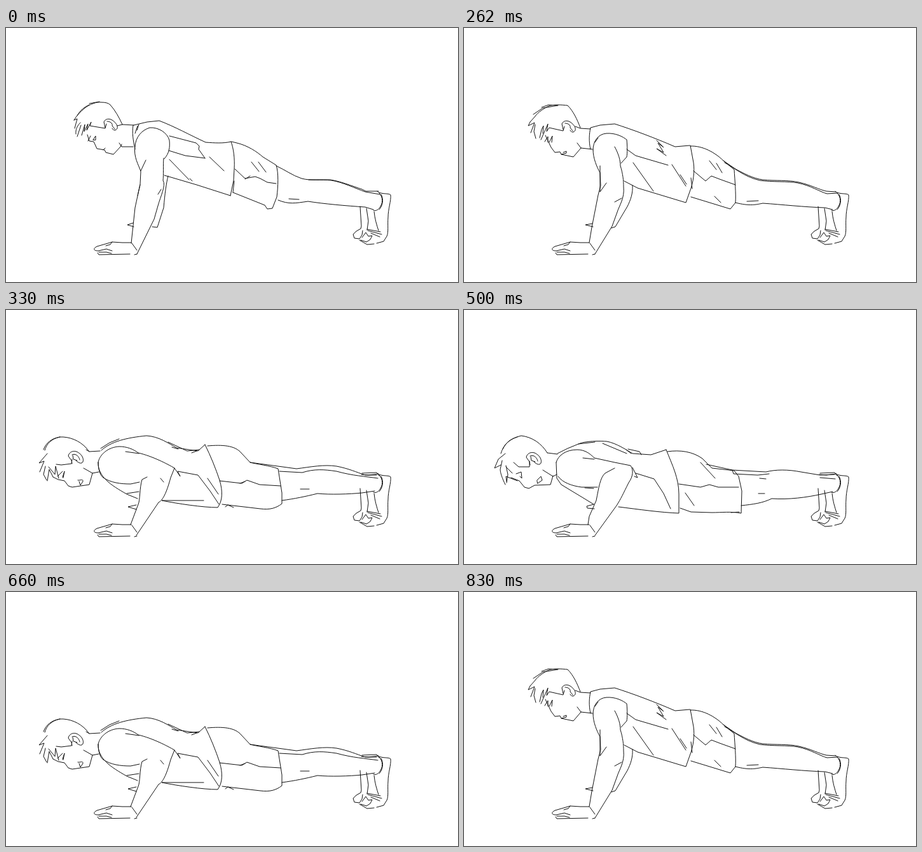
Recreate the animation shown at these times as an HTML page. Size 711x400 px, loop 1000 ms.

```html
<!DOCTYPE html>
<html lang="en">
<head>
<meta charset="utf-8">
<title>Push-up</title>
<style>
html, body { margin: 0; width: 100%; height: 100%; overflow: hidden; background: #fff; }
svg { display: block; width: 711px; height: 400px; fill: none; stroke: #111; stroke-width: 1; stroke-linecap: round; stroke-linejoin: round; }
.pose { visibility: hidden; animation: 1s step-end infinite; }
#high { animation-name: high; }
#bend { animation-name: bend; }
#low { animation-name: low; }
#floor { animation-name: floor; }
@keyframes high { 0% { visibility: visible } 16%, 100% { visibility: hidden } }
@keyframes bend { 0% { visibility: hidden } 16% { visibility: visible } 33% { visibility: hidden } 83%, 100% { visibility: visible } }
@keyframes low { 0% { visibility: hidden } 33% { visibility: visible } 50% { visibility: hidden } 66% { visibility: visible } 83%, 100% { visibility: hidden } }
@keyframes floor { 0% { visibility: hidden } 50% { visibility: visible } 66%, 100% { visibility: hidden } }
</style>
</head>
<body>
<svg viewBox="0 0 711 400">
  <defs>
    <path id="ear" d="M156 157L154 148C156 143 162 142 167 145C173 149 176 154 175 158C173 162 169 162 167 158M159 147C164 147 168 150 167 154L171 159"/>
    <path id="earLow" d="M104 242L103 237L98 230C99 224 105 221 111 223C118 226 123 233 121 239C119 243 114 241 110 237M104 228C110 225 115 231 116 236M105 229L106 235L112 237"/>
    <path id="sock" d="M560 257L583 256L587 261M559 259L570 260L586 258"/>
  </defs>

  <!-- feet and front hand -->
  <path d="M587 259C593 262 603 260 605 263C606 272 601 285 601 298C600 310 602 322 599 328L594 336L583 339"/>
  <path d="M584 257C592 263 594 273 589 281C586 286 582 289 578 287M590 262C595 270 592 281 587 286"/>
  <path d="M557 281L559 312L558 316L551 320L546 325L548 331L556 332L560 326L561 319M567 284L570 304L568 318M579 289C580 300 583 310 586 319"/>
  <path d="M568 317L589 321M569 319L591 325M574 323L588 329M560 330L566 322L570 328L576 327L573 333L567 337L558 334M556 334L568 341L579 340"/>
  <path d="M197 338L183 338L167 337L143 344C137 347 137 351 145 351L158 348L167 351M167 337L164 341L157 343M144 354L146 357L195 356M146 353L158 353L166 355M198 339L206 350M202 357L206 356"/>

  <g id="high" class="pose">
    <path d="M107 145C111 138 117 132 124 126C132 120 142 116 150 117C156 117 161 118 164 121C172 130 178 141 183 152M112 138C116 130 124 124 131 121M131 119L147 116"/>
    <path d="M107 145L112 143L108 158M117 149C112 154 109 160 110 167M112 171L118 153M119 169L124 152L123 163L129 151L127 161L134 148L132 154L156 158L158 151"/>
    <path d="M128 168L131 178L138 179L143 190L155 192L157 196L169 199L180 187L182 183M156 189L153 192M129 178L133 170M137 176L141 170L141 176Z"/>
    <use href="#ear"/>
    <path d="M175 154L183 152L201 153M178 181L182 187L200 187M200 153C198 165 200 177 203 191"/>
    <path d="M201 153L222 148L241 146C265 155 290 169 314 180C328 181 342 182 354 179M207 154L203 166M209 152L206 161"/>
    <path d="M203 186C204 172 213 161 226 157C240 156 254 165 257 177C258 188 257 197 249 206M203 186C200 203 209 216 212 226L211 246L203 283L199 320L197 339"/>
    <path d="M248 205C247 216 248 232 247 240C252 248 243 265 239 280L233 301L206 356M212 225L220 208M211 247L207 264M239 262L244 254"/>
    <path d="M255 233C252 245 250 260 248 283L238 314L230 313M201 313L191 310L200 307"/>
    <path d="M249 232L256 234L300 247L353 264M354 179C358 190 360 205 359 222L358 240L353 264"/>
    <path d="M257 170L299 181L304 186L303 191L313 205M256 193L282 201L313 205M257 207L288 239M289 237L293 241M320 203L343 225"/>
    <path d="M355 179L363 181C380 185 395 195 404 203L425 216C429 228 428 250 426 266L419 284L411 285L407 279L357 259"/>
    <path d="M360 222L376 237L392 234L400 237L411 243L425 245M376 238L384 233M386 211L398 226M397 211L409 227M359 241L357 259"/>
    <path d="M425 217C440 224 450 232 465 237C480 241 495 238 512 240C530 243 548 252 565 258L588 262M476 239L510 239C525 241 545 249 560 254L566 257L586 257"/>
    <path d="M428 271C445 278 455 276 475 273C500 277 535 280 565 282L578 286M445 269L461 270"/>
  </g>

  <g id="bend" class="pose">
    <path d="M104 148L112 139C116 133 125 127 133 123C142 120 154 121 163 122C172 131 178 144 183 157M109 136L124 126L148 122M122 125L133 121L147 122"/>
    <path d="M104 148L101 154L111 149L105 165M112 152L110 163L113 174M119 173L122 160L125 154L124 166M121 176L132 151L130 163L134 157L156 162L158 155"/>
    <path d="M128 169L137 188L143 196L151 195L153 199L161 197L161 194L156 196M153 199L172 203L184 189M127 179L132 171L132 180M134 180L139 170L138 180"/>
    <use href="#ear" y="3"/>
    <path d="M175 155L183 158L199 159M178 181L184 189L202 191M199 191C196 178 197 167 199 157L214 153L237 151C265 160 300 173 332 187L355 185"/>
    <path d="M203 192C203 178 211 167 224 166C238 165 250 171 256 176C257 187 257 197 256 203L247 213M203 192C203 205 209 219 214 228L215 248L211 263L201 314L197 338M206 180L211 173"/>
    <path d="M237 187C243 198 246 208 246 217C250 230 251 240 251 250C253 268 244 280 241 290L233 312L206 356M214 217L214 258L224 244M237 274L248 268"/>
    <path d="M265 248C266 260 262 271 257 281L238 313L232 315M203 313L191 310L202 308"/>
    <path d="M252 241L273 252L349 275L355 258C361 243 363 225 361 212L356 185"/>
    <path d="M256 191L270 201L321 216M266 212L298 257M327 215L349 249M340 231L350 246M303 177L314 188L305 181L314 196L303 190L318 201"/>
    <path d="M356 186C375 185 395 196 408 209L425 223C426 240 428 260 427 275L419 285L357 266M361 225L380 241L389 233L402 238L427 247M386 209L397 223M397 213L406 228M357 236L359 253M394 265L404 275"/>
    <path d="M410 212C425 220 440 234 465 240C485 243 510 241 525 244C545 248 560 258 571 261L588 260M408 209L427 222C440 229 455 237 470 239C490 241 510 239 527 243C545 247 560 255 570 257L585 258"/>
    <path d="M427 275C450 281 460 278 470 276C500 278 535 282 568 283L580 286M445 273L463 272"/>
  </g>

  <g id="low" class="pose">
    <path d="M61 221C64 210 72 203 84 200C100 199 116 206 126 217L131 223M59 220C62 211 69 205 77 202L85 200"/>
    <path d="M65 226L52 241L60 238L53 255M62 246L59 259L64 268M65 269L68 251L74 263M67 247L77 259L78 246L83 265M79 243L87 244L103 242L104 235"/>
    <path d="M74 263L82 267L92 269L98 277L104 279L131 275L136 257M113 268C117 269 121 265 121 270L117 276L115 270M81 262L89 254M89 263L92 254L90 264Z"/>
    <use href="#earLow"/>
    <path d="M126 220L131 223L148 222M122 249L136 257L146 255"/>
    <path d="M150 221C165 207 190 201 221 198C240 199 256 210 268 217L302 222L313 212M149 218L163 209L178 203M255 208L285 222L304 220M261 216L271 219M292 225L300 222"/>
    <path d="M145 240C147 228 160 216 178 215C190 215 200 219 208 225C230 230 255 243 265 249L259 264C252 290 246 300 240 303L205 355M188 223L209 226"/>
    <path d="M145 240C145 255 150 262 153 264C165 272 180 274 196 274L210 271M145 240C144 262 165 276 190 290L207 297M190 289L209 286"/>
    <path d="M222 263L214 267C210 280 211 300 208 306L196 338M243 265L248 271M205 307L192 310L205 314"/>
    <path d="M265 249L274 262L270 254L302 260L321 285L335 306M317 265L334 290M313 212C322 230 330 250 336 268C341 285 341 300 333 311C310 311 270 305 245 300L311 300"/>
    <path d="M317 214C340 212 360 213 370 225L384 240C395 243 415 245 428 250L434 288L434 305C425 312 415 315 400 313L340 306"/>
    <path d="M336 269L371 273L379 268L399 275L432 277M345 310L349 307L358 311M368 273L376 270"/>
    <path d="M384 240L457 250C480 247 500 243 520 246C540 250 550 255 565 260L583 260M430 254L466 256C485 250 500 251 520 254C545 261 565 262 585 265"/>
    <path d="M434 300C455 297 470 294 490 289C510 291 540 290 560 288L580 285M463 282L477 282"/>
    <use href="#sock"/>
  </g>

  <g id="floor" class="pose">
    <path d="M58 226C62 212 72 202 90 198C107 200 122 210 131 225M61 219C66 208 74 203 84 200"/>
    <path d="M65 226L54 235L48 249L58 244M60 237L57 251C57 256 60 265 65 275M66 245L69 259L67 272M66 247L76 257M67 270L66 262L84 269M78 240L86 247L103 247L103 238"/>
    <path d="M74 264L87 269L95 279L102 281L111 276L136 275L140 261M115 268L121 262L123 268L116 273ZM82 258L90 255L91 265L88 262"/>
    <use href="#earLow" y="2"/>
    <path d="M131 225L147 227M124 252L140 262L146 259"/>
    <path d="M147 226L163 218L180 211C190 206 215 206 225 207C240 210 255 220 265 226L294 228L318 220M180 211L206 208M218 210L256 226M255 220L263 226M258 219L276 223L279 228"/>
    <path d="M145 240C148 229 160 220 178 220C190 220 198 226 205 233L237 240L262 245C267 252 266 262 259 272C250 290 247 297 240 308L206 355M187 233L205 235"/>
    <path d="M145 240L146 265L153 275L186 295L204 306M148 262C155 272 170 277 185 279L210 279M190 280L204 281"/>
    <path d="M237 249L222 257C214 264 212 280 208 300L197 325L195 338M204 306L193 309L194 312L205 313"/>
    <path d="M265 248L273 264L268 262M270 257L299 266L314 289L325 313M318 220C328 245 338 265 338 290L338 320C310 319 275 314 243 310"/>
    <path d="M320 223C340 220 360 223 375 234L390 249L425 253L432 262L437 285L436 320C420 317 405 319 390 319L357 318L340 312"/>
    <path d="M338 274L372 279L386 275L400 279L432 279M348 288L362 308M372 240L395 265M420 319L433 318"/>
    <path d="M381 243L422 252L475 255C490 251 510 251 530 255L560 260L583 259M422 252L424 258L462 260L480 258M560 264L584 266"/>
    <path d="M436 308C455 306 470 304 484 297C510 299 540 295 562 290L580 286M465 265L475 266M463 289L473 289"/>
    <use href="#sock"/>
  </g>
</svg>
</body>
</html>
```
